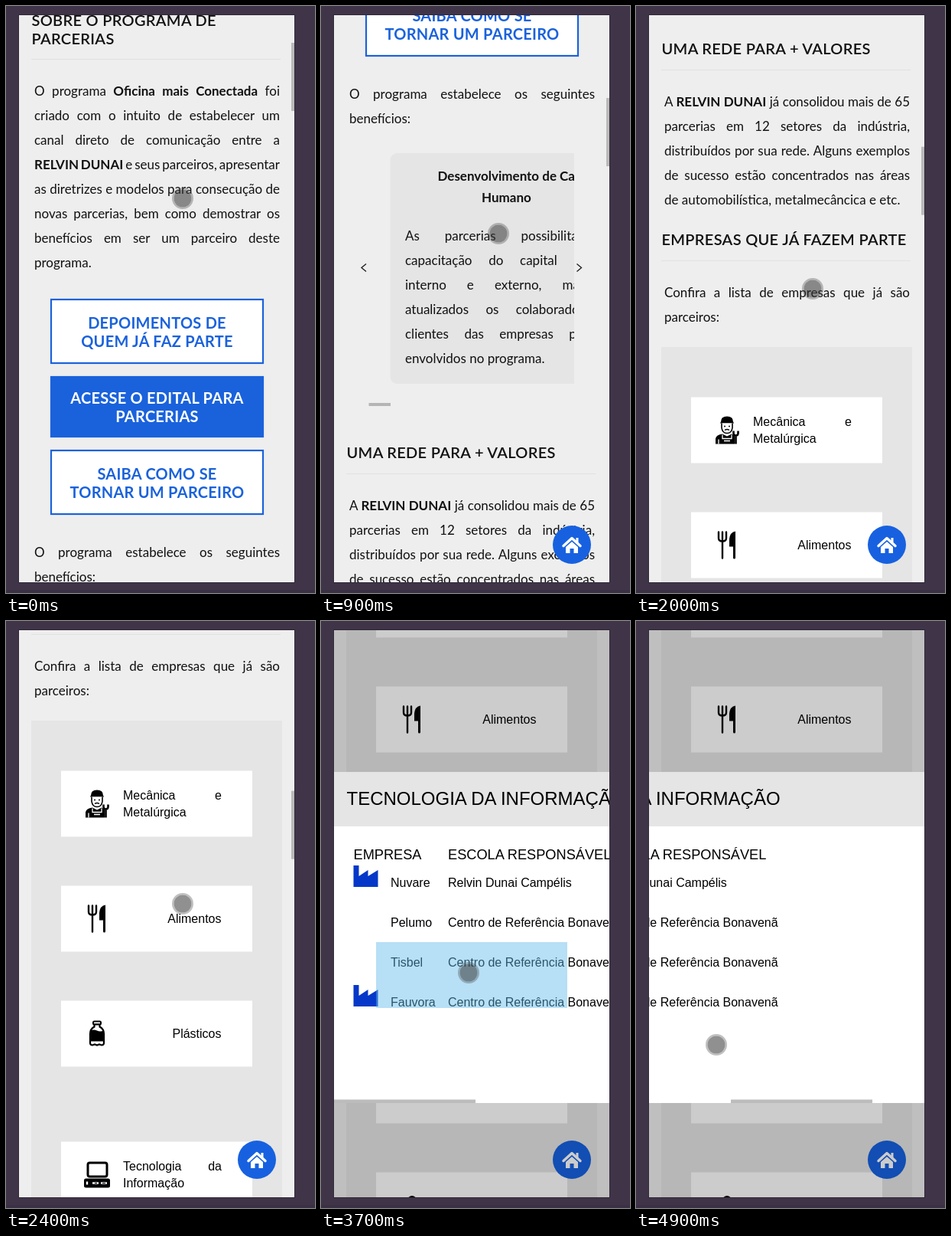
These frames come from a looping animation (404x766 px, 5000 ms). An HTML page:

```html
<!DOCTYPE html>
<html lang="pt-BR">
<head>
<meta charset="utf-8">
<title>Programa de parcerias</title>
<style>
html, body { margin: 0; height: 100%; overflow: hidden; background: #403548; }
svg { display: block; width: 100vw; height: 100vh; }
text { white-space: pre; }
.body { font: 17px Lato, sans-serif; fill: #111; }
.body tspan, .strong { font-weight: 700; }
.head { font: 600 20px Lato, sans-serif; letter-spacing: .3px; fill: #111; }
.cta { font: 700 20px Lato, sans-serif; letter-spacing: .25px; text-anchor: middle; }
.plain { font: 16px "Liberation Sans", Arial, sans-serif; fill: #000; }
.th { font-size: 18.2px; }
.title { font-size: 24px; }
.end { text-anchor: end; }
</style>
</head>
<body>
<svg viewBox="0 0 404 766">
  <defs>
    <clipPath id="screen"><rect x="17" y="12" width="360" height="740"/></clipPath>
    <clipPath id="slide"><rect x="80" y="780" width="251" height="330"/></clipPath>
    <clipPath id="dialog"><rect x="17" y="197" width="360" height="432"/></clipPath>
    <path id="factory" d="M0 0H7V14L19 6V14L32 6V28H0Z" fill="#0538c8"/>
  </defs>
  <rect width="404" height="766" fill="#403548"/>
  <rect y="762" width="404" height="4" fill="#3a3145"/>
  <rect x="16.5" y="11.5" width="361" height="741" fill="none" stroke="#312838"/>
  <g clip-path="url(#screen)">
    <rect x="17" y="12" width="360" height="740" fill="#eee"/>
    <g id="page"></g>
    <rect id="bar" x="373" width="4" height="89" fill="#bababa"/>
    <g id="home">
      <circle cx="328" cy="703" r="25" fill="#1761e0"/>
      <path d="M317 704.5L328 694.5L339 704.5" fill="none" stroke="#fff" stroke-width="3.4" stroke-linecap="round" stroke-linejoin="round"/>
      <path d="M320 706L328 699L336 706V714H330.5V708H325.5V714H320Z" fill="#fff"/>
      <rect x="333.5" y="694" width="3" height="6" fill="#fff"/>
    </g>
    <g id="modal">
      <rect x="17" y="12" width="360" height="740" opacity=".2"/>
      <rect x="17" y="197" width="360" height="432" fill="#fff"/>
      <rect x="17" y="197" width="360" height="71" fill="#e5e5e5"/>
      <g clip-path="url(#dialog)">
        <g id="table"></g>
        <rect id="hbar" y="624.5" width="185" height="4.5" fill="#bcbcbc"/>
      </g>
    </g>
    <rect id="tap" x="72" y="419" width="250" height="86" fill="#5fb8e8" fill-opacity=".45"/>
    <g id="pointer">
      <circle r="11.5" fill="#353535" fill-opacity=".55"/>
      <circle r="12.75" fill="none" stroke="#4b4b4b" stroke-opacity=".35" stroke-width="2.5"/>
    </g>
  </g>
</svg>
<script>
const $ = id => document.getElementById(id);
const LOOP = 5000, STEP = 100;

const text = (x, y, cls, str, width) =>
  `<text x="${x}" y="${y}" class="${cls}"${width ? ` data-w="${width}"` : ""}>${str}</text>`;

// Lines of a paragraph; all but the last are justified to the width.
const paragraph = (x, y, width, lines) => lines.map((s, i) =>
  text(x, y + 32 * i, "body", s, i < lines.length - 1 && width)).join("");

const rule = y => `<rect x="33" y="${y}" width="326" height="1" fill="#e1e1e1"/>`;

function cta(y, h, filled, a, b) {
  const blue = "#1a62dc", mid = y + h / 2;
  const ink = filled ? "#fff" : blue;
  return `<rect x="59" y="${y + 1}" width="277" height="${h - 2}" fill="${filled ? blue : "#fff"}" stroke="${blue}" stroke-width="2.2"/>
    <g fill="${ink}">${text(197.5, mid - 4, "cta", a)}${text(197.5, mid + 20, "cta", b)}</g>`;
}

// Icons are drawn around their own centre.
const icons = {
  mechanic: `<path d="M-8 -11Q-8 -18 0 -18Q8 -18 8 -11L9 -9H-9Z"/>
    <path d="M-7 -9V-3Q-6 4 0 4Q6 4 7 -3V-9" fill="#fff" stroke="#000" stroke-width="1.6"/>
    <path d="M-4 -5H-2M2 -5H4M-3 0Q0 -2 3 0" fill="none" stroke="#000" stroke-width="1.5"/>
    <path d="M-15 18V11Q-14 6 -6 5L0 8L6 5L10 7V18Z"/>
    <path d="M-6 6V11H6V6M-11 12V18M-4 14H4" fill="none" stroke="#fff" stroke-width="1.3"/>
    <path d="M11.500 18V8M8.500 1V4Q8.500 7 11.500 7Q14.500 7 14.500 4V1" fill="none" stroke="#000" stroke-width="2.6"/>`,
  cutlery: `<path d="M-11 -17V-9Q-11 -5 -6 -5Q-1 -5 -1 -9V-17M-6 -17V17" fill="none" stroke="#000" stroke-width="2.4" stroke-linecap="round"/>
    <path d="M11 -18V16.500Q11 18 9.500 18Q8 18 8 16.500V2H3V-8Q4 -17 11 -18Z"/>`,
  bottle: `<rect x="-5" y="-16" width="10" height="4" rx="1.5" fill="#fff" stroke="#000" stroke-width="2"/>
    <path d="M-3.500 -12V-9Q-9 -6 -9 0V12Q-9 15 -6 15L-3 14L0 15L3 14L6 15Q9 15 9 12V0Q9 -6 3.500 -9V-12Z" fill="#fff" stroke="#000" stroke-width="2.2"/>
    <path d="M-9 -4Q-4 -6 0 -4T9 -4V10H-9Z"/>`,
  computer: `<rect x="-12" y="-15.500" width="25" height="18" rx="2.5" fill="#fff" stroke="#000" stroke-width="3"/>
    <rect x="-17" y="5" width="34" height="12" rx="2.5"/>
    <path d="M-6 11H2M5 11H13M-13 9V13" stroke="#fff" stroke-width="2.4"/>
    <path d="M-3 11H0M7 11H11" stroke="#000"/>`,
  cooler: `<rect x="-17" y="-14" width="35" height="16" rx="2.500" fill="#fff" stroke="#000" stroke-width="3.4"/>
    <path d="M-10 2V-4H10V2M5 -9H12" fill="none" stroke="#000" stroke-width="3"/>
    <path d="M-6 8L-7 11M0.500 8V14M7 8L8 11" stroke="#000" stroke-width="3.4" stroke-linecap="round"/>`,
  dome: `<path d="M-6 -9Q0 -16 6 -9V6H-6Z"/>`
};

function card(y, icon, a, b) {
  const label = b
    ? text(153, y + 37, "plain", a, 129) + text(153, y + 59, "plain", b)
    : a ? text(281.5, y + 48.500, "plain end", a) : "";
  return `<rect x="72" y="${y}" width="250" height="86" fill="#fff"/>
    <g transform="translate(119 ${y + 43})">${icons[icon]}</g>${label}`;
}

$("page").innerHTML =
  text(33.5, 26, "head", "SOBRE O PROGRAMA DE") + text(33.5, 50, "head", "PARCERIAS") + rule(69) +
  paragraph(37, 117, 321, [
    "O programa <tspan>Oficina mais Conectada</tspan> foi",
    "criado com o intuito de estabelecer um",
    "canal direto de comunicação entre a",
    "<tspan>RELVIN DUNAI</tspan> e seus parceiros, apresentar",
    "as diretrizes e modelos para consecução de",
    "novas parcerias, bem como demostrar os",
    "benefícios em ser um parceiro deste",
    "programa."]) +
  cta(382, 85, false, "DEPOIMENTOS DE", "QUEM JÁ FAZ PARTE") +
  cta(483, 80, true, "ACESSE O EDITAL PARA", "PARCERIAS") +
  cta(579, 85, false, "SAIBA COMO SE", "TORNAR UM PARCEIRO") +
  paragraph(37, 719, 321, ["O programa estabelece os seguintes", "benefícios:"]) +
  `<g clip-path="url(#slide)"><rect x="90.5" y="790" width="318" height="301" rx="9" fill="#e5e5e5"/>` +
  text(152.5, 826, "body strong", "Desenvolvimento de Capital") + text(210, 854, "body strong", "Humano") +
  paragraph(110, 904, 281, [
    "As parcerias possibilitam a",
    "capacitação do capital humano",
    "interno e externo, mantendo",
    "atualizados os colaboradores e",
    "clientes das empresas parceiras",
    "envolvidos no programa."]) + "</g>" +
  `<path d="M59 934.500L53 939.500L59 944.500M334.500 934.500L340.500 939.500L334.500 944.500" fill="none" stroke="#222" stroke-width="1.4"/>
   <rect x="62.5" y="1116" width="28.5" height="4" fill="#b5b5b5"/>` +
  text(33.5, 1188, "head", "UMA REDE PARA + VALORES") + rule(1208) +
  paragraph(37, 1256, 321, [
    "A <tspan>RELVIN DUNAI</tspan> já consolidou mais de 65",
    "parcerias em 12 setores da indústria,",
    "distribuídos por sua rede. Alguns exemplos",
    "de sucesso estão concentrados nas áreas",
    "de automobilística, metalmecâncica e etc."]) +
  text(33.5, 1437, "head", "EMPRESAS QUE JÁ FAZEM PARTE") + rule(1457) +
  paragraph(37, 1505, 321, ["Confira a lista de empresas que já são", "parceiros:"]) +
  `<rect x="33" y="1570" width="328" height="1100" fill="#e5e5e5"/>` +
  card(1635.5, "mechanic", "Mecânica e", "Metalúrgica") +
  card(1785.5, "cutlery", "Alimentos") +
  card(1935.5, "bottle", "Plásticos") +
  card(2119.5, "computer", "Tecnologia da", "Informação") +
  card(2269.5, "cooler", "Refrigeração") +
  card(2419.5, "dome");

const school = "Centro de Referência Bonavenã";
const rows = [["Nuvare", "Relvin Dunai Campélis"], ["Pelumo", school], ["Tisbel", school], ["Fauvora", school]];
$("table").innerHTML =
  text(33.5, 240, "plain title", "TECNOLOGIA DA INFORMAÇÃO") +
  text(42.5, 311, "plain th", "EMPRESA") + text(166, 311, "plain th", "ESCOLA RESPONSÁVEL") +
  rows.map(([name, place], i) =>
    text(91, 347 + 52 * i, "plain", name) + text(166, 347 + 52 * i, "plain", place)).join("") +
  [319, 475].map(y => `<use href="#factory" x="42.5" y="${y}"/>`).join("");

for (const el of document.querySelectorAll("[data-w]")) {
  const gaps = el.textContent.split(" ").length - 1;
  el.style.wordSpacing = (el.dataset.w - el.getComputedTextLength()) / gaps + "px";
}

// Value at time t along [time, value] keys.
function along(keys, t) {
  const i = keys.findIndex(k => k[0] > t);
  if (i < 0) return keys[keys.length - 1][1];
  if (i === 0) return keys[0][1];
  const [t0, a] = keys[i - 1], [t1, b] = keys[i];
  return a + (b - a) * (t - t0) / (t1 - t0);
}

const scroll = [[0, 0], [150, 50], [900, 598], [1300, 918], [1500, 1055], [1700, 1125], [2000, 1125],
  [2150, 1190], [2550, 1590], [2700, 1680], [2800, 1699], [3000, 1700]];
const drag = [[4400, 0], [4600, 8], [4700, 28], [4800, 69], [4900, 209]];
const px = [[0, 231], [900, 232], [1300, 231], [3050, 231], [3500, 193], [3800, 193], [4300, 314]];
const py = [[0, 251], [600, 260], [900, 297], [1300, 369], [3050, 369], [3500, 459], [3800, 459], [4300, 553]];

function draw(t) {
  const s = along(scroll, t), d = along(drag, t);
  $("page").setAttribute("transform", `translate(0 ${-s})`);
  $("bar").setAttribute("y", 48 + s * .1206);
  $("bar").setAttribute("opacity", along([[3050, 1], [3400, 0]], t));
  $("home").setAttribute("opacity", along([[300, 0], [550, 1]], t));
  $("modal").setAttribute("visibility", t >= 3700 ? "visible" : "hidden");
  $("table").setAttribute("transform", `translate(${-d} 0)`);
  $("hbar").setAttribute("x", 17 + d * 360 / 703);
  $("tap").setAttribute("opacity", t < 3700 ? 0 : along([[3700, 1], [3950, 0]], t));
  $("pointer").setAttribute("transform", `translate(${along(px, t) - d} ${along(py, t)})`);
}

const start = performance.now();
function tick() {
  const t = (performance.now() - start) % LOOP;
  draw(Math.floor(t / STEP) * STEP);
  requestAnimationFrame(tick);
}
tick();
</script>
</body>
</html>
```
